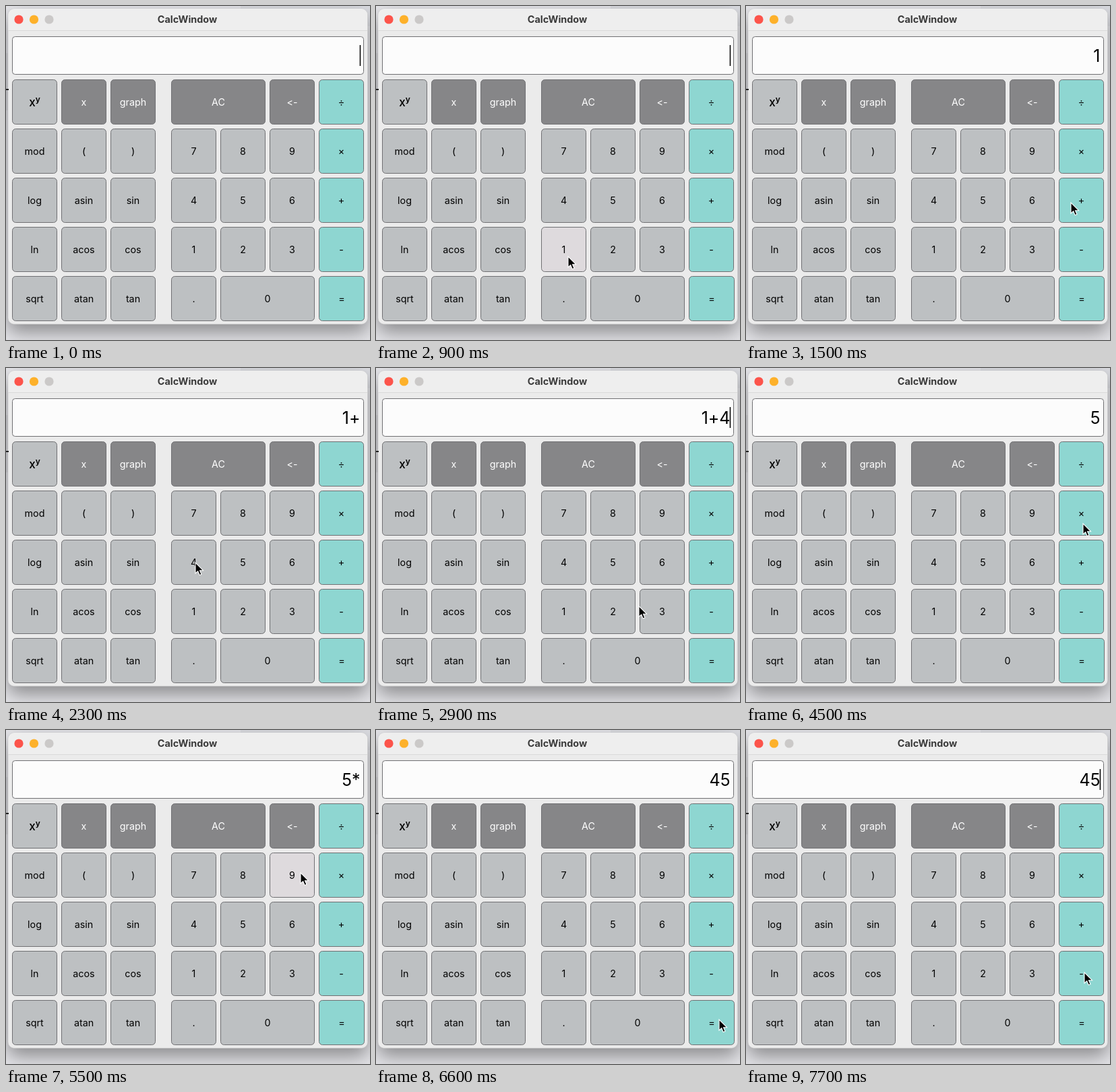
Animation of 540 by 496 pixels, one loop 8000 ms. Source, as an HTML page:

```html
<!DOCTYPE html>
<html lang="en">
<head>
<meta charset="utf-8">
<title>CalcWindow</title>
<style>
  html, body { margin: 0; width: 100%; height: 100%; overflow: hidden; background: #e6e6ea; }
  svg { display: block; }
  text {
    font: 14.3px Inter, "Liberation Sans", sans-serif;
    font-feature-settings: "calt" 0, "liga" 0;
    text-anchor: middle;
  }
  .frame { fill: #ebebeb; stroke: #c4c4c6; stroke-width: .6; filter: drop-shadow(0 12px 14px rgba(0, 0, 0, .4)); }
  .title { font-size: 14.4px; font-weight: 700; fill: #3a3a3a; }
  .box { stroke: #707073; fill: #fcfcfc; }
  .key .box { fill: #bdc0c2; }
  .dark .box { fill: #868688; }
  .dark text { fill: #fff; }
  .teal .box { fill: #8ed6d1; }
  .down .box { fill: #dedadd; }
  .power { font-size: 17px; font-weight: 500; }
  .power tspan { font-size: 12px; font-weight: 600; }
  #value { font-size: 25px; text-anchor: end; }
</style>
</head>
<body>
<svg width="540" height="496" viewBox="0 0 540 496">
  <rect x="348" width="192" height="30" fill="#dcdde2"/>
  <rect y="70" width="20" height="85" fill="#dcdce0"/>
  <rect class="frame" x="3" y="4" width="533.5" height="468.5" rx="9"/>
  <path d="M3.5 36V13a9 9 0 0 1 9-9H527a9 9 0 0 1 9 9V36Z" fill="#eeeeee"/>
  <path d="M3 36.5H536" stroke="#dadada"/>
  <rect y="123" width="4" height="2" fill="#222"/>
  <circle cx="19" cy="20" r="6.6" fill="#fc544b"/>
  <circle cx="41.5" cy="20" r="6.6" fill="#fdb12b"/>
  <circle cx="64" cy="20" r="6.6" fill="#cbc9c8"/>
  <text class="title" x="269" y="25">CalcWindow</text>
  <rect class="box" x="9.5" y="45.5" width="521" height="56" rx="4"/>
  <text id="value" x="525.5" y="83"></text>
  <rect id="caret" x="524.7" y="58" width="1.5" height="31"/>
  <g id="keys"></g>
  <path id="cursor" d="M0 0V16L3.7 12.7L6.2 18.6L8.9 17.4L6.5 11.7H11.5Z" stroke="#fff" stroke-width="1.1"/>
</svg>
<script>
const LOOP = 8000, STEP = 100;
const $ = id => document.getElementById(id);
const columns = [9, 82, 155, 245, 318, 391, 464];
const rows = [
  ["xy", "x", "graph", "AC", null, "<-", "÷"],
  ["mod", "(", ")", "7", "8", "9", "×"],
  ["log", "asin", "sin", "4", "5", "6", "+"],
  ["ln", "acos", "cos", "1", "2", "3", "-"],
  ["sqrt", "atan", "tan", ".", "0", null, "="]
];
const darkKeys = ["x", "graph", "AC", "<-"];
const wideKeys = ["AC", "0"];
const keys = {};

function addKey(label, col, row) {
  const g = document.createElementNS("http://www.w3.org/2000/svg", "g");
  const x = columns[col], y = 109 + row * 73;
  const w = wideKeys.includes(label) ? 140 : label === "=" ? 68 : 67;
  const tone = col === 6 ? "teal" : darkKeys.includes(label) ? "dark" : "";
  g.setAttribute("class", "key " + tone);
  g.innerHTML = `<rect class="box" x="${x + .5}" y="${y + .5}" width="${w - 1}" height="66" rx="5"/>` +
    (label === "xy"
      ? `<text class="power" x="${x + 33.5}" y="${y + 40}">x<tspan dy="-6">y</tspan></text>`
      : `<text x="${x + w / 2}" y="${y + 38.7}">${label.replace("<", "&lt;")}</text>`);
  $("keys").append(g);
  keys[label] = g;
}
rows.forEach((labels, row) => labels.forEach((label, col) => label && addKey(label, col, row)));

// time, x, y
const path = [
  [100, 84, 458], [600, 285, 372], [1000, 285, 372], [1500, 482, 292],
  [1600, 484, 291], [1900, 484, 291], [2300, 281, 289], [2600, 281, 289],
  [3200, 499, 418], [3600, 499, 418], [4500, 500, 231], [4600, 505, 212],
  [4800, 505, 212], [5200, 437, 212], [5600, 437, 212], [6200, 509, 430],
  [6600, 509, 430], [7300, 500, 362], [7400, 502, 360]
];
const values = [
  [0, ""], [1000, "1"], [1800, "1+"], [2600, "1+4"], [3500, "5"],
  [4600, "5*"], [5600, "5*9"], [6600, "45"]
];
const presses = [[900, "1"], [2500, "4"], [3400, "="], [5500, "9"], [6500, "="]];

function cursorAt(t) {
  const i = path.findIndex(p => p[0] > t);
  if (i < 0) return path.at(-1).slice(1);
  const [t0, x0, y0] = path[Math.max(i - 1, 0)], [t1, x1, y1] = path[i];
  const u = Math.max(0, (t - t0) / (t1 - t0)), e = u * u * (3 - 2 * u);
  return [x0 + (x1 - x0) * e, y0 + (y1 - y0) * e];
}

function draw(t) {
  $("value").textContent = values.findLast(v => v[0] <= t)[1];
  $("caret").style.display = (t + 300) % 1000 < 500 ? "" : "none";
  $("cursor").style.display = t < path[0][0] ? "none" : "";
  $("cursor").setAttribute("transform", `translate(${cursorAt(t)})`);
  const press = presses.find(([start]) => t >= start && t < start + STEP);
  for (const label in keys) keys[label].classList.toggle("down", !!press && press[1] === label);
}

let begin;
function tick(now) {
  begin ??= now;
  draw(Math.floor((now - begin) % LOOP / STEP) * STEP);
  requestAnimationFrame(tick);
}
draw(0);
requestAnimationFrame(tick);
</script>
</body>
</html>
```
